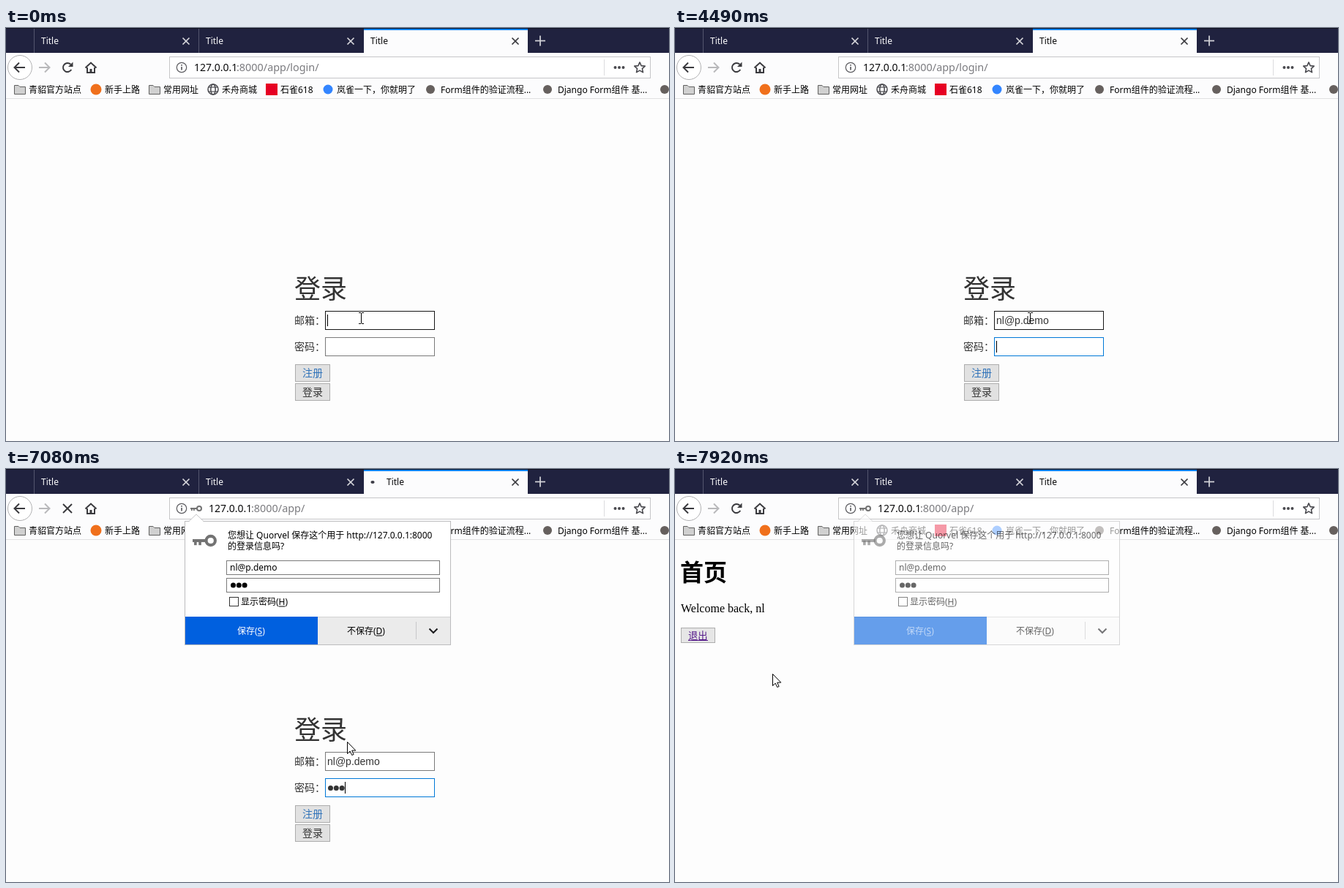
An HTML page with a canvas for the animation above (8000 ms loop, 906 px wide and 565 px high).

```html
<!DOCTYPE html>
<html lang="zh-CN">
<head>
<meta charset="utf-8">
<title>Title</title>
<style>
html, body { margin: 0; width: 100%; height: 100%; overflow: hidden; background: #fdfdfd; }
canvas { display: block; }
</style>
</head>
<body>
<canvas id="stage" width="906" height="565"></canvas>
<script>
const ctx = document.getElementById('stage').getContext('2d');
const LOOP = 8000;
const UI = '"Noto Sans", "Noto Sans CJK SC", "Noto Sans CJK", sans-serif';
const ARIAL = '"Liberation Sans", "Noto Sans CJK SC", sans-serif';
const SERIF = '"Liberation Serif", serif';
const MAIL = 'nl@p.demo';
const USER = 'nl';

// [time, characters typed, caret visible]
const mailKeys = [[0, 0, 1], [250, 0, 0], [680, 0, 1], [1240, 1, 1], [1520, 2, 1], [1830, 2, 0],
  [2260, 2, 1], [2570, 3, 1], [2840, 3, 0], [3430, 4, 0], [3550, 4, 1], [3700, 5, 1],
  [3870, 6, 1], [4030, 7, 1], [4200, 8, 1], [4370, 9, 0]];
const passKeys = [[0, 0, 0], [4490, 0, 1], [5050, 0, 0], [5170, 1, 1], [5450, 2, 1], [5600, 3, 1],
  [6030, 3, 0], [6420, 3, 1]];
// [time, x, y]
const mouseKeys = [[7080, 466, 373], [7200, 401, 340], [7350, 336, 307], [7470, 266, 292],
  [7620, 201, 284], [7770, 156, 281], [7920, 133, 280]];
// [time, opacity]
const popupKeys = [[0, 0], [6700, 0.35], [6810, 0.75], [6930, 1], [7920, 0.6]];

const at = (keys, t) => keys.reduce((found, k) => (k[0] <= t ? k : found), keys[0]);

function rect(x, y, w, h, fill) {
  ctx.fillStyle = fill;
  ctx.fillRect(x, y, w, h);
}

function box(x, y, w, h, fill, border) {
  rect(x, y, w, h, fill);
  ctx.strokeStyle = border;
  ctx.lineWidth = 1;
  ctx.strokeRect(x + 0.5, y + 0.5, w - 1, h - 1);
}

function text(s, x, y, size, color = '#000', family = UI, weight = 400, align = 'left') {
  ctx.font = `${weight} ${size}px ${family}`;
  ctx.textAlign = align;
  ctx.fillStyle = color;
  ctx.fillText(s, x, y);
  return ctx.measureText(s).width;
}

function disc(x, y, r, fill) {
  ctx.beginPath();
  ctx.arc(x, y, r, 0, 7);
  ctx.fillStyle = fill;
  ctx.fill();
}

function ring(x, y, r, color, width) {
  ctx.beginPath();
  ctx.arc(x, y, r, 0, 7);
  ctx.strokeStyle = color;
  ctx.lineWidth = width;
  ctx.stroke();
}

function path(points, closed) {
  ctx.beginPath();
  points.forEach(([x, y]) => ctx.lineTo(x, y));
  if (closed) ctx.closePath();
}

function line(points, color, width = 2, closed = false) {
  path(points, closed);
  ctx.strokeStyle = color;
  ctx.lineWidth = width;
  ctx.stroke();
}

function cross(x, y, r, color, width) {
  line([[x - r, y - r], [x + r, y + r]], color, width);
  line([[x - r, y + r], [x + r, y - r]], color, width);
}

function arrow(x, y, dir, color) {
  line([[x - 7 * dir, y], [x + 7 * dir, y]], color);
  line([[x + dir, y - 6.5], [x + 7.5 * dir, y], [x + dir, y + 6.5]], color);
}

function dots(x, y, n, r, step, color) {
  for (let i = 0; i < n; i++) disc(x + i * step, y, r, color);
}

function key(x, y, s) {
  ring(x + 24 * s, y, 6 * s, '#737373', 4 * s);
  rect(x, y - 2 * s, 18 * s, 4 * s, '#737373');
  rect(x + 2 * s, y, 3.5 * s, 6 * s, '#737373');
  rect(x + 8 * s, y, 3.5 * s, 6 * s, '#737373');
}

function folder(x) {
  path([[x + 0.5, 78.5], [x + 6, 78.5], [x + 8, 80.5], [x + 15.5, 80.5], [x + 15.5, 90.5], [x + 0.5, 90.5]], true);
  ctx.fillStyle = '#d0d0d0';
  ctx.fill();
  ctx.strokeStyle = '#606060';
  ctx.lineWidth = 1;
  ctx.stroke();
}

function globe(x, y) {
  ring(x, y, 7, '#4a4a4f', 1.5);
  ctx.beginPath();
  ctx.ellipse(x, y, 3.2, 7, 0, 0, 7);
  ctx.stroke();
  for (const d of [-3, 3]) line([[x - 6.5, y + d], [x + 6.5, y + d]], '#4a4a4f', 1.2);
}

function star(x, y) {
  const pts = [];
  for (let i = 0; i < 10; i++) {
    const a = i * Math.PI / 5 - Math.PI / 2, r = i % 2 ? 3.6 : 7.6;
    pts.push([x + r * Math.cos(a), y + r * Math.sin(a)]);
  }
  ctx.lineJoin = 'round';
  line(pts, '#4a4a4f', 1.6, true);
  ctx.lineJoin = 'miter';
}

function tabs(t) {
  rect(0, 0, 906, 34, '#20223f');
  rect(0, 0, 906, 1, '#10111f');
  for (const x of [38, 263]) {
    rect(x, 1, 1, 33, '#54566d');
    text('Title', x + 10, 22, 12, '#f9f9fa');
    cross(x + 208, 18, 4.5, '#d5d5da', 1.7);
  }
  rect(489, 1, 224, 33, '#fcfcfd');
  rect(489, 1, 224, 2, '#0a84ff');

  const loading = t >= 6560 && t < 7200;
  if (t >= 7200 && t < 7620) {
    const edge = t < 7350 ? 570 : t < 7470 ? 653 : 698;
    ctx.save();
    ctx.beginPath();
    ctx.rect(489, 3, 224, 31);
    ctx.clip();
    disc(edge - 160, 18, 160, t < 7470 ? '#d7e8fb' : '#eef5fd');
    ctx.restore();
  }
  if (loading) {
    const swing = Math.cos((t - 7080) / 1000 * 2 * Math.PI);
    ctx.beginPath();
    ctx.ellipse(505 - 4 * swing, 18, 2.6, 2, 0, 0, 7);
    ctx.fillStyle = '#3c3c46';
    ctx.fill();
  }
  text('Title', loading ? 520 : 498, 22, 12, '#0c0c0d');
  cross(696, 18, 4.5, '#3a3a3f', 1.7);
  line([[723, 17.5], [737, 17.5]], '#d5d5da', 1.7);
  line([[730, 10.5], [730, 24.5]], '#d5d5da', 1.7);
}

function reload(t) {
  const ink = '#3a3a3e';
  if (t >= 6560 && t < 7350) return cross(84, 54, 6, ink, 2);
  if (t >= 7350 && t < 7470) return line([[78, 48], [89, 60]], '#c4c4c6', 1.8);
  ctx.beginPath();
  ctx.arc(84, 54, 6, 0.5, 5.5);
  ctx.strokeStyle = ink;
  ctx.lineWidth = 2;
  ctx.stroke();
  path([[91.5, 46.5], [91.5, 53], [85, 53]], true);
  ctx.fillStyle = ink;
  ctx.fill();
}

function toolbar(t) {
  const ink = '#3a3a3e';
  rect(0, 34, 906, 62, '#fcfcfd');
  rect(0, 96, 906, 1, '#e1e1e2');
  disc(19, 54, 16.5, '#fff');
  ring(19, 54, 16.5, '#b1b1b3', 1);
  arrow(19, 54, -1, ink);
  arrow(52, 54, 1, '#b9b9bb');
  reload(t);
  line([[108.5, 54.5], [116, 47.5], [123.5, 54.5]], ink);
  line([[111, 54], [111, 61], [121, 61], [121, 54]], ink);
  rect(114.5, 56, 3, 5, ink);

  box(223, 39, 658, 30, '#fff', '#c6c6c8');
  ring(240, 54, 6.7, '#5c5c60', 1.2);
  rect(239.2, 53, 1.7, 4.5, '#5c5c60');
  rect(239.2, 50, 1.7, 1.7, '#5c5c60');
  const saved = t >= 6200;
  if (saved) key(252, 54, 0.5);
  const x = saved ? 277 : 257;
  text('127.0.0.1', x, 59, 14, '#0c0c0d');
  text(t < 6560 ? ':8000/app/login/' : ':8000/app/', x + 58, 59, 14.4, '#7b7b7f');
  rect(817, 43, 1, 22, '#dcdcde');
  dots(832.5, 54, 3, 2, 5.5, '#4a4a4f');
  star(866, 54.5);
}

function bookmarks() {
  const label = (s, x) => text(s, x, 88.5, 12);
  folder(11);
  label('青貂官方站点', 31);
  disc(123, 84, 7.5, '#f0701c');
  label('新手上路', 135);
  folder(195);
  label('常用网址', 215);
  globe(283, 84);
  label('禾舟商城', 295);
  rect(355, 76, 16, 16, '#e60023');
  label('石雀618', 375);
  disc(440, 84, 6.5, '#3385ff');
  label('岚雀一下，你就明了', 452);
  for (const x of [580, 740, 900]) disc(x, 84, 6, '#66605e');
  label('Form组件的验证流程...', 594);
  label('Django Form组件 基...', 754);
}

function button(s, y, color) {
  box(395, y, 48, 24, '#e1e1e1', '#adadad');
  text(s, 419, y + 17, 14, color, ARIAL, 400, 'center');
}

function login(t) {
  const ink = '#333';
  text('登录', 394, 370, 36, ink, ARIAL);
  text('邮箱：', 394, 405, 14, ink, ARIAL);
  text('密码：', 394, 441, 14, ink, ARIAL);
  box(436, 387, 150, 26, '#fff', t < 7080 ? '#171717' : '#7a7a7a');
  box(436, 423, 150, 26, '#fff', t < 4490 ? '#7a7a7a' : '#0078d7');

  const [, typed, mailCaret] = at(mailKeys, t);
  const w = text(MAIL.slice(0, typed), 439, 405, 14, ink, ARIAL);
  if (mailCaret) rect(Math.floor(439.2 + w), 392, 1, 16, '#000');

  const [, count, passCaret] = at(passKeys, t);
  dots(443.5, 436.5, count, 3.5, 7.8, ink);
  if (passCaret) rect(439 + 8 * count, 428, 1, 16, '#000');

  button('注册', 460, '#2f72b9');
  button('登录', 486, ink);
}

function home() {
  text('首页', 7, 153, 32, '#000', UI, 700);
  text('Welcome back, ' + USER, 8, 196, 16, '#000', SERIF);
  box(8, 217, 47, 21, '#e6e6e6', '#adadad');
  text('退出', 18, 232.5, 13.33, '#551a8b', ARIAL);
  rect(18, 234, 27, 1, '#551a8b');
}

function accessLabel(s, letter, x, y, color) {
  const w = text(s + '(', x, y, 12, color);
  const lw = text(letter, x + w, y, 12, color);
  text(')', x + w + lw, y, 12, color);
  rect(x + w, y + 1.5, lw, 1, color);
}

function popup(alpha) {
  if (!alpha) return;
  ctx.globalAlpha = alpha;
  box(244, 71, 364, 170, '#fff', '#bcbcbe');
  path([[250, 72], [260, 62], [270, 72]]);
  ctx.fillStyle = '#fff';
  ctx.fill();
  line([[250, 71.5], [260, 62], [270, 71.5]], '#c6c6c8', 1);
  key(255, 98, 1.03);
  text('您想让 Quorvel 保存这个用于 http://127.0.0.1:8000', 303, 95, 12);
  text('的登录信息吗?', 303, 110, 12);
  box(301, 125, 292, 20, '#fff', '#7a7a7a');
  text(MAIL, 306, 139, 12);
  box(301, 149, 292, 20, '#fff', '#7a7a7a');
  dots(310.5, 159, 3, 3.5, 7.8, '#000');
  box(305, 175, 13, 13, '#fff', '#333');
  accessLabel('显示密码', 'H', 321, 186, '#000');

  rect(245, 202, 362, 1, '#d2d2d3');
  rect(245, 202, 181, 38, '#0060df');
  rect(426, 203, 181, 37, alpha < 1 ? '#fafafa' : '#ebebeb');
  accessLabel('保存', 'S', 316, 226, '#fff');
  accessLabel('不保存', 'D', 466, 226, '#000');
  rect(560, 209, 1, 24, '#c8c8ca');
  line([[578.5, 218.5], [584, 224], [589.5, 218.5]], '#1c1c1f', 2);
  ctx.globalAlpha = 1;
}

function pointer(t) {
  if (t < 7080) {
    rect(485, 390, 1, 14, '#000');
    for (const y of [389, 404]) {
      rect(482, y, 3, 1, '#000');
      rect(486, y, 3, 1, '#000');
    }
    return;
  }
  const [, x, y] = at(mouseKeys, t);
  const shape = [[0, 0], [0, 16], [3.7, 12.6], [6.2, 18], [8.6, 17], [6.2, 11.6], [11.3, 11.6]];
  path(shape.map(([a, b]) => [x + 0.5 + a, y + 0.5 + b]), true);
  ctx.fillStyle = '#fff';
  ctx.fill();
  ctx.strokeStyle = '#000';
  ctx.lineWidth = 1;
  ctx.stroke();
}

function draw(t) {
  rect(0, 0, 906, 565, '#fdfdfd');
  tabs(t);
  toolbar(t);
  bookmarks();
  if (t < 7200) login(t);
  else home();
  popup(at(popupKeys, t)[1]);
  pointer(t);
}

const start = performance.now();
function tick() {
  draw((performance.now() - start) % LOOP);
  requestAnimationFrame(tick);
}
tick();
</script>
</body>
</html>
```
